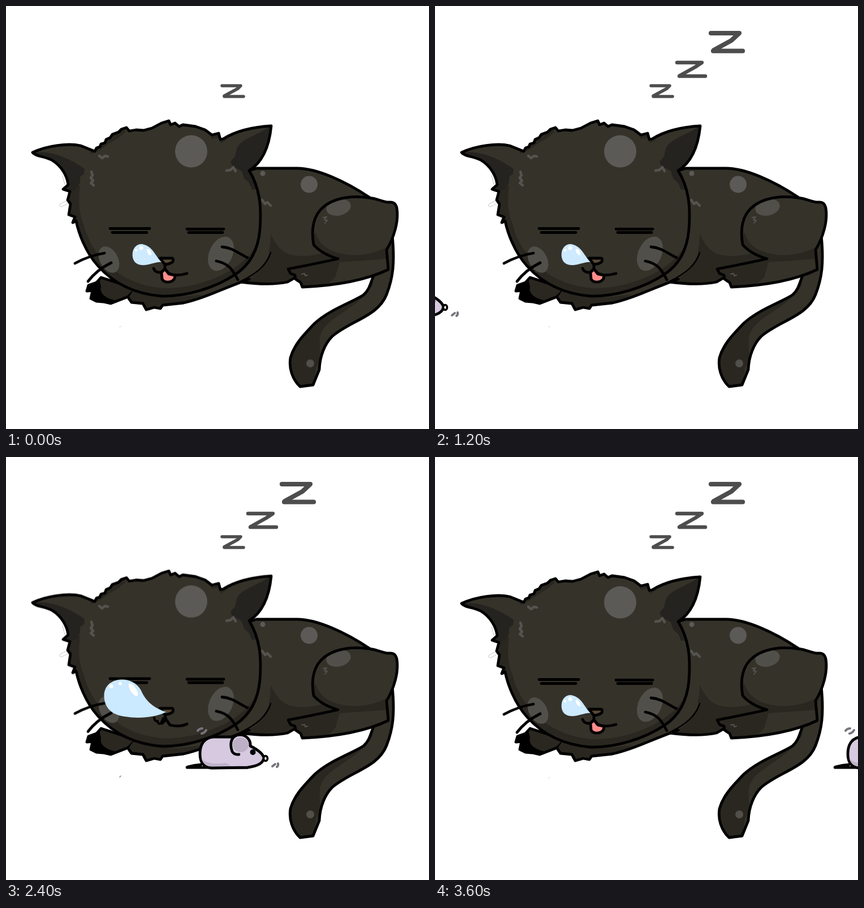
These frames come from a looping animation (748x748 px, 4000 ms). An HTML page without scripts:

```html
<!DOCTYPE html>
<html lang="en">
<head>
<meta charset="utf-8">
<title>Sleeping cat</title>
<style>
html, body { margin: 0; width: 100%; height: 100%; overflow: hidden; background: #fff; }
svg { display: block; width: 100vw; height: 100vh; }
.ink { stroke: #000; stroke-width: 4.8; stroke-linejoin: round; stroke-linecap: round; }
.fur { fill: #35322a; }
.dark { fill: #292720; }
.ear { fill: #25231f; }
.spot { fill: #5b5a57; }
.pale { fill: #514f4a; }
.line { fill: none; stroke-linecap: round; stroke-linejoin: round; }
.tuft { stroke: #55534e; stroke-width: 4.5; }
.thin { stroke-width: 2; }
.mark { stroke: #77757c; stroke-width: 4; }
.z { stroke: #4d4d4d; }

.head, .in, .out, .z2, .z3, .mouse { animation: 4s step-end infinite; }
.head { animation-name: breathe; }
.out { animation-name: big; }
.in { animation-name: small; }
.z2 { animation-name: second; }
.z3 { animation-name: third; }
.mouse { animation-name: run; }

@keyframes breathe {
  0%, 20%, 50%, 70%, 90% { transform: none; }
  10%, 40%, 60%, 80% { transform: translateY(-1.5px); }
}
@keyframes big {
  0%, 20%, 50%, 70%, 90% { opacity: 0; }
  10%, 40%, 60%, 80% { opacity: 1; }
}
@keyframes small {
  0%, 20%, 50%, 70%, 90% { opacity: 1; }
  10%, 40%, 60%, 80% { opacity: 0; }
}
@keyframes second {
  0%, 40%, 70% { opacity: 0; }
  10%, 50%, 80% { opacity: 1; }
}
@keyframes third {
  0%, 40%, 70% { opacity: 0; }
  20%, 60%, 90% { opacity: 1; }
}
@keyframes run {
  0% { transform: translateX(-400px); }
  30% { transform: translateX(-264px); }
  40% { transform: translateX(-150px); }
  50% { transform: none; }
  60% { transform: translateX(177px); }
  70% { transform: translateX(362px); }
  80% { transform: translateX(464px); }
  90% { transform: translateX(564px); }
}
</style>
</head>
<body>
<svg viewBox="0 0 748 748">
  <defs>
    <path id="skull" d="M47 259C72 247 110 242 132 247L157 257L160 251L166 249L168 244L175 242L177 236L184 233L188 227L199 223L204 218L213 215L218 221L230 219L243 220L258 216L275 207L288 203L291 210L299 207L306 213L313 210L335 213L352 219L364 228L376 225L379 236L384 235C405 222 435 214 469 212C466 243 456 275 430 291C449 322 452 355 449 395C446 430 433 457 405 475C370 498 320 514 275 513C225 509 190 490 163 460C140 435 128 400 124 380L118 383L122 373L111 369L114 350L109 343L113 328L101 324L110 316C108 300 98 283 82 273C70 266 52 266 47 259Z"/>
    <path id="tail" d="M683 405C688 455 684 482 673 510C658 549 610 556 577 584C564 597 555 618 554 643L543 670L520 673C506 660 500 640 503 622C510 597 528 580 546 561C572 537 610 525 632 511C645 500 645 485 655 465L676 420Z"/>
    <path id="leg" d="M642 339C600 333 566 344 551 367C540 385 541 405 544 422C555 435 570 442 587 447C565 452 540 457 520 461L499 465L503 473L511 476L512 483L521 489L524 497C570 495 630 488 676 466L673 431C686 410 695 380 691 357C689 348 684 346 677 347C665 347 660 341 642 339Z"/>
    <clipPath id="inSkull"><use href="#skull"/></clipPath>
    <clipPath id="inTail"><use href="#tail"/></clipPath>
    <clipPath id="inLeg"><use href="#leg"/></clipPath>
  </defs>

  <g class="line z">
    <path stroke-width="5.5" d="M382 141H415L410 146L386 159M386 160H420"/>
    <path class="z2" stroke-width="6.4" d="M428 100H472L460 108L433 123M432 124H478"/>
    <path class="z3" stroke-width="8.2" d="M488 48H538L524 61L493 78M492 79.500H544"/>
  </g>

  <!-- tail -->
  <use href="#tail" class="fur"/>
  <path class="dark" clip-path="url(#inTail)" d="M650 490C632 528 580 545 562 570C545 595 565 612 548 640L542 680H490V560Z"/>
  <circle class="pale" cx="538" cy="632" r="7"/>
  <use href="#tail" class="ink" fill="none"/>

  <!-- body -->
  <path class="fur" d="M425 291L443 287H515C550 287 600 310 642 338L660 460L512 481L498 488C475 493 445 491 420 488L380 420Z"/>
  <path class="dark" d="M468 403C478 425 490 437 505 440C530 445 548 440 560 437L588 447L500 465L512 482L496 488C475 492 445 490 420 488C452 470 468 445 468 403Z"/>
  <path class="line ink" d="M430 291L443 287H515C550 287 600 310 642 338M415 488C445 492 475 493 498 488L510 481"/>
  <circle class="spot" cx="536" cy="315.500" r="15"/>
  <circle class="spot" cx="454" cy="296" r="4.500"/>
  <path class="line tuft" stroke-width="3" d="M453 343L458 350L462 347L468 353"/>

  <!-- hind leg -->
  <use href="#leg" class="fur"/>
  <path class="dark" clip-path="url(#inLeg)" d="M535 400L548 402C556 428 580 437 606 440C635 442 655 436 676 425V447L590 453L582 480L560 500H490V455Z"/>
  <ellipse class="pale" cx="588" cy="356" rx="22" ry="14.500" transform="rotate(-12 588 356)"/>
  <path class="line tuft thin" d="M561 374L567 373L563 378L568 379L564 384M523 474L528 473L529 477L533 476"/>
  <use href="#leg" class="ink" fill="none"/>

  <!-- front paws -->
  <path class="dark ink" d="M168 480L160 489L146 494L143 504L153 503L150 517L160 522L172 523L185 526L216 514L230 500Z"/>
  <path d="M165 484L145 494L143 505L155 503L150 517L162 523L185 526L195 521C175 517 165 508 168 496Z"/>
  <path class="fur" d="M468 436C460 462 440 480 415 488C380 502 350 517 314 525L277 529L273 536L262 534L248 537L242 526L222 524L217 515L260 490L440 430Z"/>
  <path class="dark" d="M217 515L222 524L242 526L248 537L262 534L273 536L277 529L314 525L350 510L300 515L225 503Z"/>
  <path class="line ink" d="M430 483C385 499 350 517 314 525L277 529L273 535L262 533L248 537L242 526L222 524L217 517"/>
  <path class="line ink" style="stroke-width:2.600" d="M468 436C461 458 445 472 415 487"/>

  <g class="head">
    <path class="line" stroke="#c4c4c4" d="M100 300L104 316M110 343L96 350Q92 354 98 355L110 349M201 568l2-2"/>
    <use href="#skull" class="fur"/>
    <g clip-path="url(#inSkull)">
      <path class="dark" d="M106 316L131 318C127 350 130 368 137 385C150 440 200 494 280 499C350 500 425 463 443 420L453 390V530H90Z"/>
      <path class="dark" d="M150 262L167 254L184 242L198 234L212 222L198 210L150 240ZM354 214L364 235L376 233L380 243L392 235L380 215Z"/>
      <path class="ear" d="M47 259C80 255 112 269 139 288L138 297L131 302L131 312L125 323L108 330C108 295 90 275 47 259Z"/>
      <path class="ear" d="M469 212C443 229 414 236 408 252L405 266L397 275L400 283L410 288L417 292L421 305L430 313L435 325L445 324L432 291C455 275 465 245 469 212Z"/>
      <circle class="spot" cx="327.500" cy="257" r="28.500"/>
    </g>
    <path class="line tuft" d="M165 265L170 269L175 265L180 266M151 293L153 299L150 304L154 309L150 313L155 317M390 291L397 290L402 285L406 292"/>
    <ellipse class="pale" cx="182" cy="448.500" rx="16" ry="25" transform="rotate(-28 182 448.500)"/>
    <ellipse class="pale" cx="380" cy="438" rx="20.500" ry="32" transform="rotate(25 380 438)"/>
    <use href="#skull" class="ink" fill="none"/>
    <path class="line ink" d="M184 393.500H254M188 400.500H249M320 394.500H385M323 400.500H383"/>
    <path class="line ink" d="M122 455Q148 441 174 437M145 487Q160 467 186 454M382 426C400 427 412 438 427 445M372 451C393 455 400 465 410 484"/>
    <path class="ink" fill="#574a35" d="M272 446H293Q297 446 295 452Q291 456 281 457Z"/>

    <g class="in">
      <path class="ink" fill="#ff8d8b" d="M275 471L276 483C280 490 293 490 298 482L299 476L288 473L281 465Z"/>
      <path class="line ink" d="M281 457V465L274 471Q264 472 261 464M281 465L288 474Q303 478 320 473"/>
      <path fill="#cdeaff" d="M275 453C263 441 260 425 241 421C229 420 222 431 224 444C226 456 236 459 246 458C258 457 265 452 275 453Z"/>
      <g fill="#fff">
        <circle cx="239" cy="428" r="3.500"/>
        <circle cx="230" cy="432" r="2.300"/>
        <ellipse cx="253" cy="435" rx="3" ry="6.500" transform="rotate(-30 253 435)"/>
      </g>
    </g>

    <g class="out" transform="translate(0 1.500)">
      <path class="line" stroke="#888" stroke-width="1.500" d="M201 566l2-2"/>
      <path class="ink fur" style="stroke-width:4" d="M262 461Q263 468 268 467Q269 473 274 471L278 462"/>
      <path class="line ink" d="M281 457L283 464L276 471M283 464L290 474Q308 478 320 472"/>
      <path fill="#cbe9ff" d="M283 451C256 442 245 427 239 413C231 398 216 393 204 393.500C185 394 174 406 173.500 421C173 441 185 456 210 459C235 463 262 461 283 451Z"/>
      <g fill="#fff">
        <circle cx="186" cy="405.500" r="3.500"/>
        <circle cx="202" cy="400.500" r="3"/>
        <ellipse cx="225" cy="411.500" rx="5" ry="13" transform="rotate(-33 225 411.500)"/>
      </g>
    </g>
  </g>

  <g class="mouse">
    <path class="line ink" d="M143 549H250M144 548Q156 545 168 544"/>
    <path class="ink" fill="#d6c9e0" d="M186 550C170 548 166 538 166 525C166 509 173 496 190 495H225L255 511C267 517 277 524 279 532C278 543 265 547 250 549Z"/>
    <path fill="#c0b3c9" d="M169 534C181 544 198 543 212 541L222 547H186Q173 547 169 534Z"/>
    <path fill="#d6c9e0" d="M236 526L224 524C216 507 222 492 236 491C248 491 256 500 255 512L246 526Z"/>
    <ellipse cx="238" cy="509" rx="14" ry="13" fill="#bcafc6"/>
    <path class="line ink" d="M235 526Q227 527 223 521C217 504 223 492 236 491C248 491 256 500 255 511"/>
    <circle cx="259.500" cy="522" r="5"/>
    <ellipse class="ink" cx="282" cy="533" rx="3.500" ry="4.500" fill="#fff" style="stroke-width:3.600"/>
    <path class="line mark" d="M294 547L299 543M302 548Q305 546 304 542M162 484Q165 480 170 480M169 489Q174 488 177 483"/>
  </g>
</svg>
</body>
</html>
```
